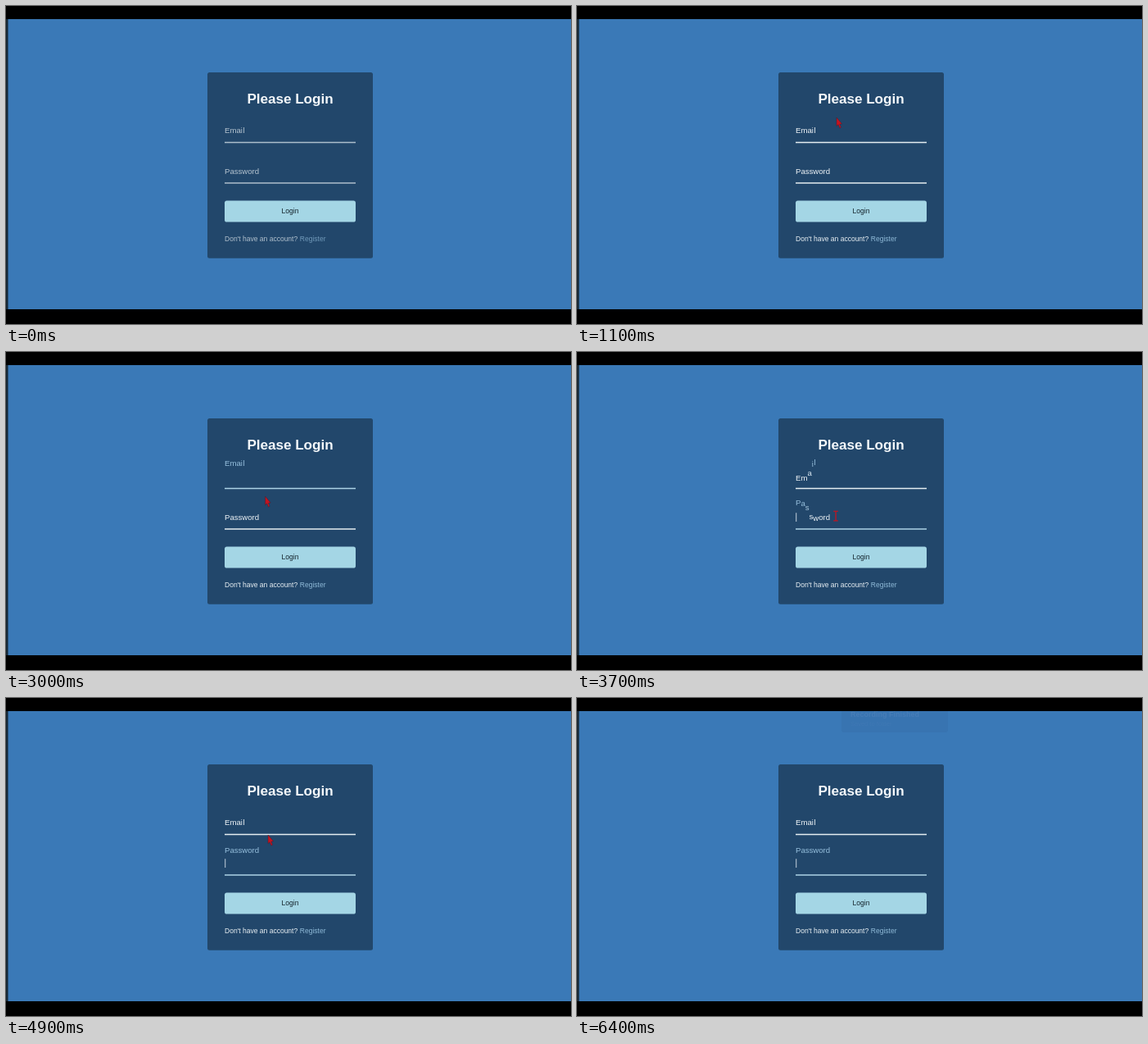
Recreate the animation shown at these times as an HTML page with a canvas. Size 690 px wide and 388 px high, loop 6.5 s.

```html
<!DOCTYPE html>
<html lang="en">
<head>
<meta charset="utf-8">
<title>Login form</title>
<style>
  html, body { margin: 0; width: 100%; height: 100%; overflow: hidden; background: #000; }
  canvas { display: block; }
</style>
</head>
<body>
<canvas id="stage" width="690" height="388"></canvas>
<script>
const ctx = document.getElementById('stage').getContext('2d');
const LOOP = 6500;
const EMAIL_FOCUS = 1990;
const PASSWORD_FOCUS = 3440;
const BLINK = 600;
const FONT = '"Liberation Sans", Arial, sans-serif';
const WHITE = [240, 245, 248];
const LIGHT = [151, 192, 222];
const RED = '#c5141f';

const clamp = v => Math.min(1, Math.max(0, v));
const rgb = c => `rgb(${c.map(Math.round).join(',')})`;
const mix = (a, b, p) => a.map((v, i) => v + (b[i] - v) * clamp(p));

// cubic-bezier(0.68, -0.55, 0.265, 1.55)
function backEase(x) {
  if (x <= 0) return 0;
  if (x >= 1) return 1;
  const curve = (a, b, s) => 3 * a * s * (1 - s) ** 2 + 3 * b * s * s * (1 - s) + s ** 3;
  let lo = 0, hi = 1;
  for (let i = 0; i < 24; i++) {
    const mid = (lo + hi) / 2;
    if (curve(0.68, 0.265, mid) < x) lo = mid; else hi = mid;
  }
  return curve(-0.55, 1.55, lo);
}

function rect(x, y, w, h, color, radius = 0) {
  ctx.fillStyle = color;
  ctx.beginPath();
  ctx.roundRect(x, y, w, h, radius);
  ctx.fill();
}

function text(str, x, y, size, color, weight = 'normal', align = 'left') {
  ctx.font = `${weight} ${size}px ${FONT}`;
  ctx.textAlign = align;
  ctx.fillStyle = color;
  ctx.fillText(str, x, y);
}

// Each letter rises on focus and falls on blur, 50 ms after the one before.
function label(word, base, t, focus, blur) {
  let x = 267;
  [...word].forEach((ch, i) => {
    const step = start => backEase((t - start - i * 50) / 300);
    const p = step(focus) - step(blur);
    text(ch, x, base - 16.2 * p, 9.6, rgb(mix(WHITE, LIGHT, p)));
    x += Math.max(2.67, ctx.measureText(ch).width);
  });
}

function field(word, base, t, focus, blur) {
  const focused = t >= focus && t < blur;
  rect(267, base + 10.3, 160, 1.5, focused ? '#add3e6' : '#e4edf1');
  label(word, base, t, focus, blur);
  if (focused && Math.floor((t - focus) / BLINK) % 2 === 0) {
    rect(267.3, base - 8.6, 0.9, 10.6, '#d5e0e8');
  }
}

// time, x, y
const path = [
  [700, 338, 10], [1100, 317, 136], [1500, 317, 159], [2800, 317, 159],
  [3250, 316, 200], [3750, 316, 200], [4100, 319, 244], [4300, 319, 244],
  [4850, 320, 167], [4950, 320, 167], [5300, 322, 60], [5550, 344, 2]
];

function pointerAt(t) {
  const n = path.findIndex(k => k[0] > t);
  if (n < 1) return null;
  const [a, b] = [path[n - 1], path[n]];
  let p = (t - a[0]) / (b[0] - a[0]);
  p = p * p * (3 - 2 * p);
  return [a[1] + (b[1] - a[1]) * p, a[2] + (b[2] - a[2]) * p];
}

function polygon(points) {
  ctx.beginPath();
  points.forEach(([x, y]) => ctx.lineTo(x, y));
  ctx.closePath();
  ctx.fillStyle = RED;
  ctx.fill();
  ctx.strokeStyle = 'rgba(70,25,45,.7)';
  ctx.lineWidth = 0.6;
  ctx.stroke();
}

function pointer(t) {
  const pos = pointerAt(t);
  if (!pos) return;
  const [x, y] = pos;
  const overField = (y > 139 && y < 166.5) || (y > 188 && y < 216);
  const overButton = y > 237 && y < 264;
  ctx.save();
  ctx.translate(x, y);
  if (overField) {
    rect(-0.6, -5.5, 1.3, 11.5, RED);
    rect(-2.8, -6.3, 5.6, 1.2, RED);
    rect(-2.8, 5.3, 5.6, 1.2, RED);
  } else if (overButton) {
    polygon([[-1, 0], [1, 0], [1, 4.5], [6, 5.5], [6, 9], [5, 12.5],
             [-1, 12.5], [-4, 7.5], [-3, 6.5], [-1, 8]]);
  } else {
    polygon([[0, 0], [0, 10.5], [2.1, 8.7], [3.8, 13], [5.5, 12.2], [3.9, 8.2], [6.5, 7.8]]);
  }
  ctx.restore();
}

function notice(t) {
  ctx.globalAlpha = clamp((t - 5450) / 150);
  rect(323, 16, 130, 26, '#3874b1', [0, 0, 3, 3]);
  text('Recording Finished', 334, 23, 9, '#477db7', 'bold');
  text('Saved to folder', 334, 34, 7.5, '#3f78b4');
  ctx.globalAlpha = 1;
}

function draw(t) {
  rect(0, 0, 690, 388, '#000');
  rect(0, 16, 690, 354, '#3a79b7');
  rect(0, 16, 2.5, 354, '#172733');
  if (t > 5450) notice(t);
  rect(0, 0, 690, 16, '#000');

  rect(246, 81, 202, 226.7, '#22476b', 2.5);
  text('Please Login', 347, 118.8, 17.07, '#f4f8fb', 'bold', 'center');

  // Small type settles in just after the start.
  ctx.globalAlpha = 0.72 + 0.28 * clamp(t / 400);
  field('Email', 155.4, t, EMAIL_FOCUS, PASSWORD_FOCUS);
  field('Password', 204.9, t, PASSWORD_FOCUS, Infinity);
  text("Don't have an account? ", 267, 286.6, 8.53, '#e9f0f4');
  text('Register', 358.8, 286.6, 8.53, '#8fbad8');
  ctx.globalAlpha = 1;

  rect(267, 237.6, 160, 26, '#a4d6e5', 2.7);
  text('Login', 347, 253.3, 8.53, '#14232b', 'normal', 'center');
  pointer(t);
}

let start;
function frame(now) {
  start ??= now;
  draw((now - start) % LOOP);
  requestAnimationFrame(frame);
}
draw(0);
requestAnimationFrame(frame);
</script>
</body>
</html>
```
